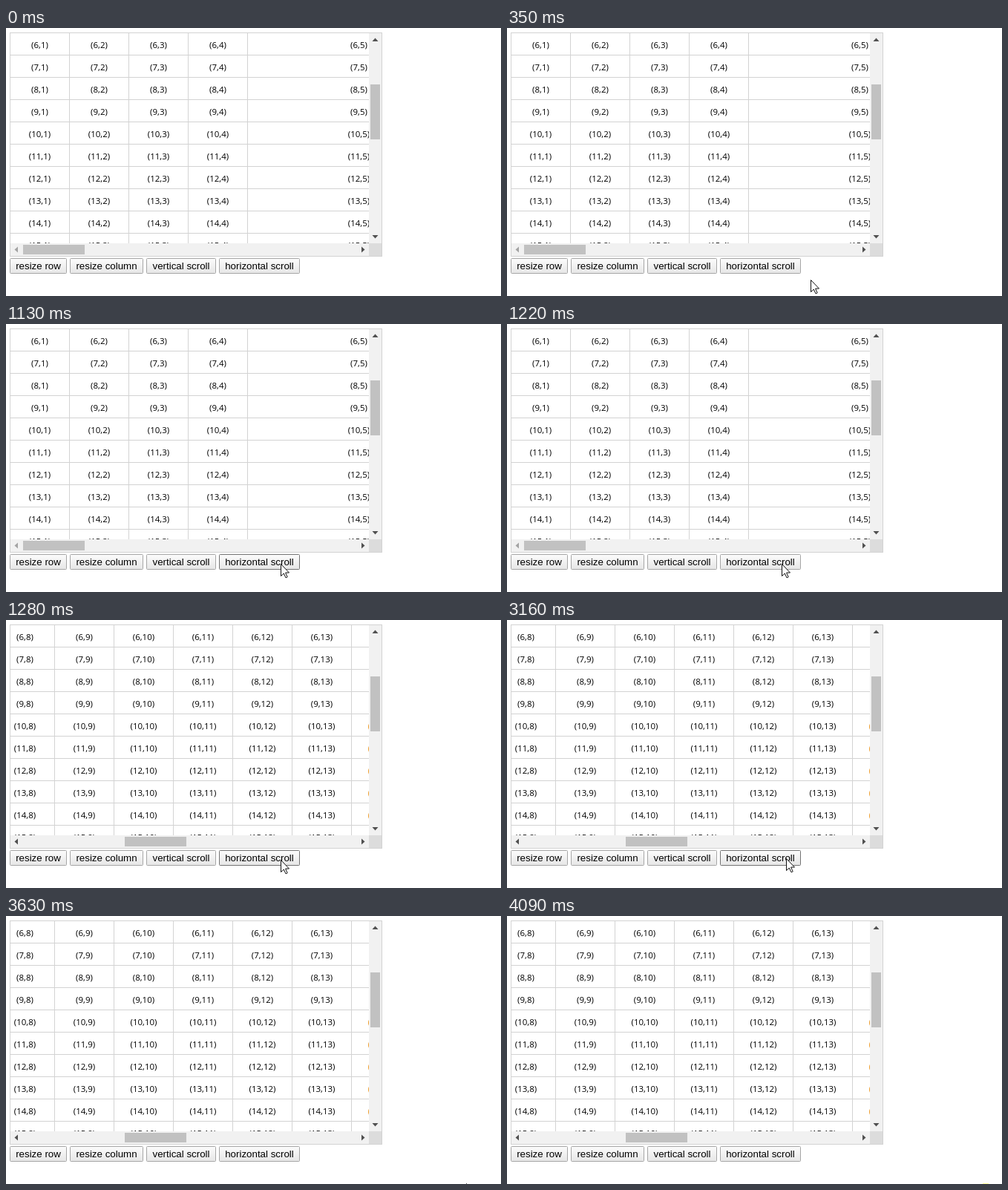
An HTML page for the animation above (4250 ms loop, 667 px wide and 361 px high).

```html
<!DOCTYPE html>
<html lang="en">
<head>
<meta charset="utf-8">
<title>Grid scroll</title>
<style>
  html, body { margin: 0; width: 100%; height: 100%; overflow: hidden; background: #fff; }
  svg { display: block; }
  .cell { font: 11.5px "Open Sans", "Noto Sans", sans-serif; text-anchor: middle; }
  .label { font: 13.333px "Liberation Sans", Arial, sans-serif; text-anchor: middle; }
</style>
</head>
<body>
<svg id="stage" width="667" height="361" viewBox="0 0 667 361">
  <defs>
    <clipPath id="view"><rect x="6" y="7" width="483" height="283"/></clipPath>
    <linearGradient id="face" x2="0" y2="1">
      <stop stop-color="#fcfcfc"/><stop offset="1" stop-color="#e6e6e6"/>
    </linearGradient>
  </defs>
</svg>
<script>
const LOOP = 4250, SCROLL_AT = 1280, SCROLL_X = 800;
const LINE = '#d3d3d3', TRACK = '#f1f1f1', THUMB = '#c1c1c1', ARROW = '#505050';
const stage = document.getElementById('stage');

function add(parent, tag, attrs, text) {
  const el = document.createElementNS('http://www.w3.org/2000/svg', tag);
  for (const key in attrs) el.setAttribute(key, attrs[key]);
  if (text) el.textContent = text;
  parent.append(el);
  return el;
}
const rect = (parent, x, y, width, height, fill) =>
  add(parent, 'rect', { x, y, width, height, fill });
const path = (d, fill) => add(stage, 'path', { d, fill });

// Grid: the fifth column is wide, all others are equal
const view = add(stage, 'g', { 'clip-path': 'url(#view)' });
const grid = add(view, 'g', {});
const ROWS = 10, COLS = 14, ROW_H = 30;
let left = 6;
for (let col = 1; col <= COLS; col++) {
  const width = col === 5 ? 300 : 80;
  rect(grid, left + width - 1, 7, 1, 283, LINE);
  for (let i = 0; i < ROWS; i++) {
    add(grid, 'text', {
      class: 'cell', x: left + (width - 1) / 2, y: 27 + i * ROW_H,
      fill: col === COLS ? '#f0a030' : '#000'
    }, `(${i + 6},${col})`);
  }
  left += width;
}
for (let i = 1; i < ROWS; i++) rect(view, 6, 6 + i * ROW_H, 483, 1, LINE);

// Scrollbars
rect(stage, 489, 7, 17, 283, TRACK);
rect(stage, 6, 290, 483, 17, TRACK);
rect(stage, 489, 290, 17, 17, '#dcdcdc');
rect(stage, 491, 76, 13, 74, THUMB);
const thumb = rect(stage, 23, 292, 83, 13, THUMB);
path('M497.5 13.5L501.5 18H493.5Z', ARROW);
path('M497.5 283.5L501.5 279H493.5Z', ARROW);
const leftArrow = path('M11.5 298.5L16 294.5V302.5Z', ARROW);
path('M483.5 298.5L479 294.5V302.5Z', ARROW);
add(stage, 'rect', { x: 5.5, y: 6.5, width: 501, height: 301, fill: 'none', stroke: LINE });

// Buttons
function button(x, width, text) {
  const box = add(stage, 'rect', {
    x: x + .5, y: 310.5, width: width - 1, height: 20, rx: 1,
    fill: 'url(#face)', stroke: '#a6a6a6'
  });
  add(stage, 'text', { class: 'label', x: x + width / 2, y: 325 }, text);
  return box;
}
button(5, 77, 'resize row');
button(86, 99, 'resize column');
button(189, 94, 'vertical scroll');
const scrollButton = button(287, 109, 'horizontal scroll');

const cursor = add(stage, 'path', {
  d: 'M.5 .5V16.5L4.3 13L7 18.8L9.2 17.8L6.6 12H11.5Z',
  fill: '#fff', stroke: '#111'
});
const glint = rect(stage, 641, 360, 8, 1, '#ffff99');

// Pointer steps: time, x, y (no position hides it)
const POINTER = [
  [0], [130, 479, 351], [210, 440, 345], [290, 409, 339], [360, 390, 333],
  [440, 380, 329], [520, 374, 327], [590, 371, 326], [670, 370, 325], [1130, 370, 323],
  [3160, 376, 321], [3240, 398, 326], [3310, 470, 333], [3390, 549, 342],
  [3520, 585, 350], [3580, 606, 355], [3630, 620, 360], [3710]
];

function draw(t) {
  const [, x, y] = POINTER.findLast(step => step[0] <= t);
  const shown = x !== undefined;
  cursor.style.display = shown ? '' : 'none';
  if (shown) cursor.setAttribute('transform', `translate(${x} ${y})`);

  const pressed = t >= 1220 && t < SCROLL_AT;
  const hover = shown && x >= 287 && x < 396 && y >= 310 && y < 331;
  scrollButton.setAttribute('stroke', hover && !pressed ? '#737373' : '#a6a6a6');

  const scrolled = t >= SCROLL_AT;
  grid.setAttribute('transform', `translate(${scrolled ? -SCROLL_X : 0} 0)`);
  thumb.setAttribute('x', scrolled ? 160 : 23);
  leftArrow.setAttribute('fill', scrolled ? ARROW : '#a3a3a3');
  glint.style.display = t >= 4090 ? '' : 'none';
}

const start = performance.now();
function tick() {
  draw((performance.now() - start) % LOOP);
  requestAnimationFrame(tick);
}
draw(0);
requestAnimationFrame(tick);
</script>
</body>
</html>
```
